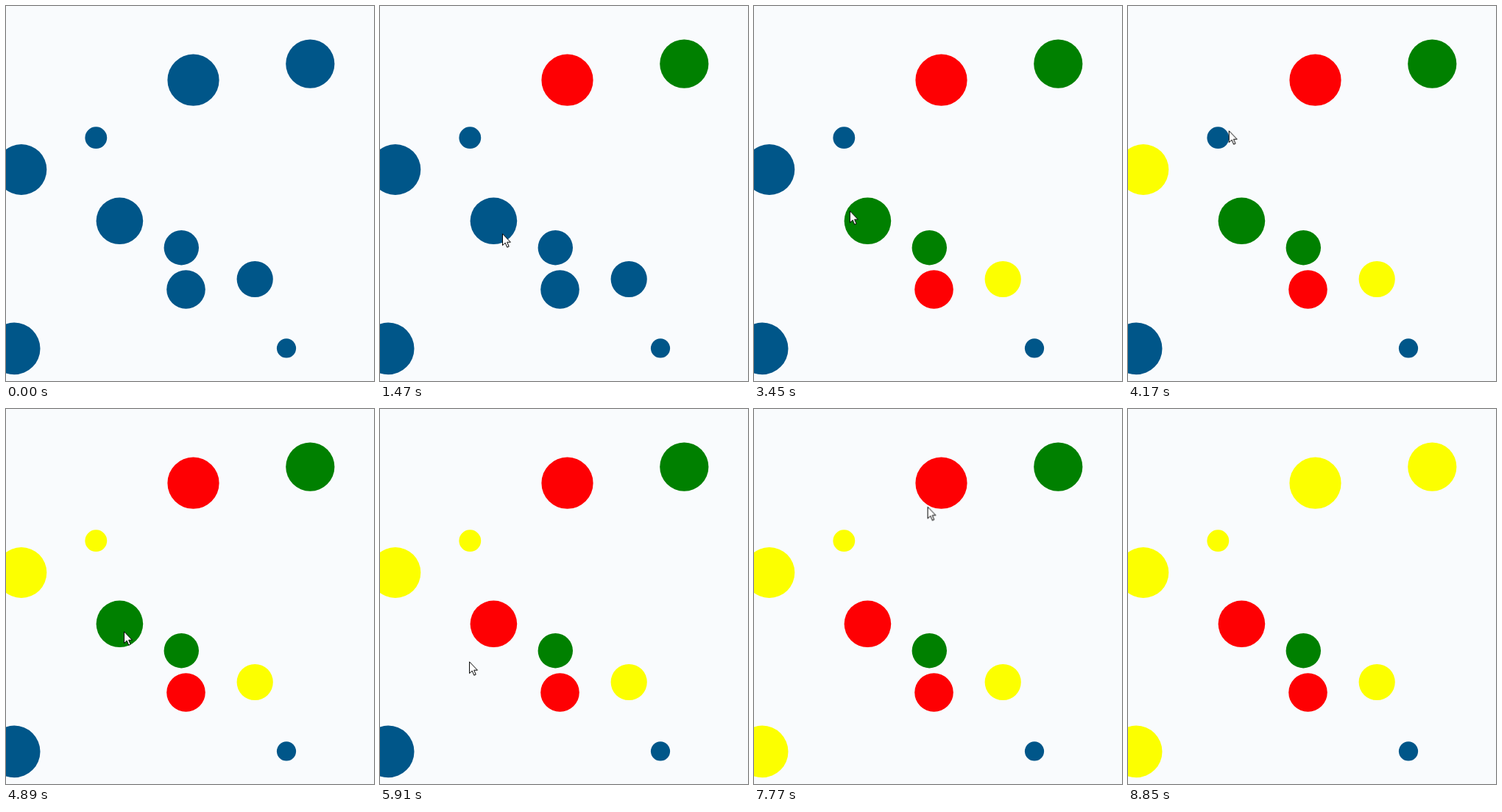
Animation of 500x510 px, one loop 9.15 s. Source, as an HTML page without scripts:

```html
<!DOCTYPE html>
<html lang="en">
<head>
<meta charset="utf-8">
<title>Clickable dots</title>
<style>
  :root { --blue: #005689; --red: #fe0003; --green: #008000; --yellow: #fcff00; }
  html, body { margin: 0; width: 100%; height: 100%; overflow: hidden; background: #f9fbfd; }
  svg { display: block; width: 100%; height: 100%; }

  circle { fill: var(--blue); animation: 9.15s step-end infinite; }
  #top { animation-name: top; }
  #corner { animation-name: corner; }
  #small { animation-name: small; }
  #left { animation-name: left; }
  #mid { animation-name: mid; }
  #upper { animation-name: upper; }
  #lower { animation-name: lower; }
  #right { animation-name: right; }
  #bottom { animation-name: bottom; }

  @keyframes corner { 5.57% { fill: var(--green); } 93.44%, to { fill: var(--yellow); } }
  @keyframes top { 9.18% { fill: var(--red); } 88.19%, to { fill: var(--yellow); } }
  @keyframes mid { 17.7% { fill: var(--green); } 55.4% { fill: var(--yellow); } 60.98%, to { fill: var(--red); } }
  @keyframes upper { 25.24%, to { fill: var(--green); } }
  @keyframes lower { 29.5%, to { fill: var(--red); } }
  @keyframes right { 34.75%, to { fill: var(--yellow); } }
  @keyframes left { 41.63%, to { fill: var(--yellow); } }
  @keyframes small { 48.52%, to { fill: var(--yellow); } }
  @keyframes bottom { 73.76%, to { fill: var(--yellow); } }

  #cursor {
    fill: #fff; stroke: #000; stroke-linejoin: miter;
    animation: move 9.15s linear infinite, show 9.15s step-end infinite;
  }
  @keyframes show { 0%, 96.72%, to { visibility: hidden; } 1.31% { visibility: visible; } }
  @keyframes move {
    0%, 1.31% { transform: translate(473px, 62px); animation-timing-function: ease-out; }
    3.6%, 5.57% { transform: translate(399px, 97px); animation-timing-function: ease-in-out; }
    7.54%, 9.18% { transform: translate(253px, 112px); }
    10.49% { transform: translate(285px, 128px); }
    11.8% { transform: translate(250px, 172px); }
    13.11% { transform: translate(234px, 235px); animation-timing-function: ease-out; }
    16.05%, 17.7% { transform: translate(166px, 309px); }
    20.33% { transform: translate(212px, 392px); animation-timing-function: ease-out; }
    23.28%, 25.24% { transform: translate(238px, 334px); animation-timing-function: ease-in-out; }
    27.21%, 29.5% { transform: translate(254px, 391px); animation-timing-function: ease-in-out; }
    33.11%, 34.75% { transform: translate(335px, 385px); animation-timing-function: ease-in-out; }
    39.67%, 41.63% { transform: translate(30px, 226px); }
    44.9% { transform: translate(153px, 169px); }
    45.56% { transform: translate(137px, 169px); animation-timing-function: ease-out; }
    46.55%, 48.52% { transform: translate(131px, 169px); animation-timing-function: ease-in-out; }
    53.44%, 60.98% { transform: translate(160px, 302px); animation-timing-function: ease-in-out; }
    64.58% { transform: translate(121px, 343px); animation-timing-function: ease-in-out; }
    66.22%, 67.86% { transform: translate(148px, 304px); animation-timing-function: ease-in-out; }
    71.47%, 73.76% { transform: translate(7px, 449px); }
    74.1% { transform: translate(23px, 437px); }
    75.4% { transform: translate(58px, 405px); }
    77.7% { transform: translate(115px, 326px); }
    81.97% { transform: translate(224px, 230px); animation-timing-function: ease-out; }
    84.9% { transform: translate(235px, 133px); animation-timing-function: ease-out; }
    86.88%, 88.19% { transform: translate(256px, 106px); }
    88.52% { transform: translate(274px, 97px); animation-timing-function: ease-out; }
    92.13%, 93.44% { transform: translate(415px, 76px); animation-timing-function: ease-in; }
    96.4%, to { transform: translate(490px, 52px); }
  }
</style>
</head>
<body>
<svg viewBox="0 0 500 510">
  <circle id="top" cx="254.5" cy="100.7" r="35.1"/>
  <circle id="corner" cx="413.3" cy="78.7" r="33.1"/>
  <circle id="small" cx="122.3" cy="179.2" r="14.9"/>
  <circle id="left" cx="20.8" cy="222.5" r="34.5"/>
  <circle id="mid" cx="154.4" cy="292.3" r="31.8"/>
  <circle id="upper" cx="238.3" cy="328.7" r="23.7"/>
  <circle id="lower" cx="244.5" cy="385.5" r="26.3"/>
  <circle id="right" cx="338.2" cy="371.5" r="24.6"/>
  <circle cx="381" cy="465.4" r="13.1"/>
  <circle id="bottom" cx="11.2" cy="465.9" r="35.3"/>
  <path id="cursor" d="M.5 .8V16.6L4.2 13.1L6.8 19.2L9.2 18.1L6.7 12.2H11.4Z"/>
</svg>
</body>
</html>
```
